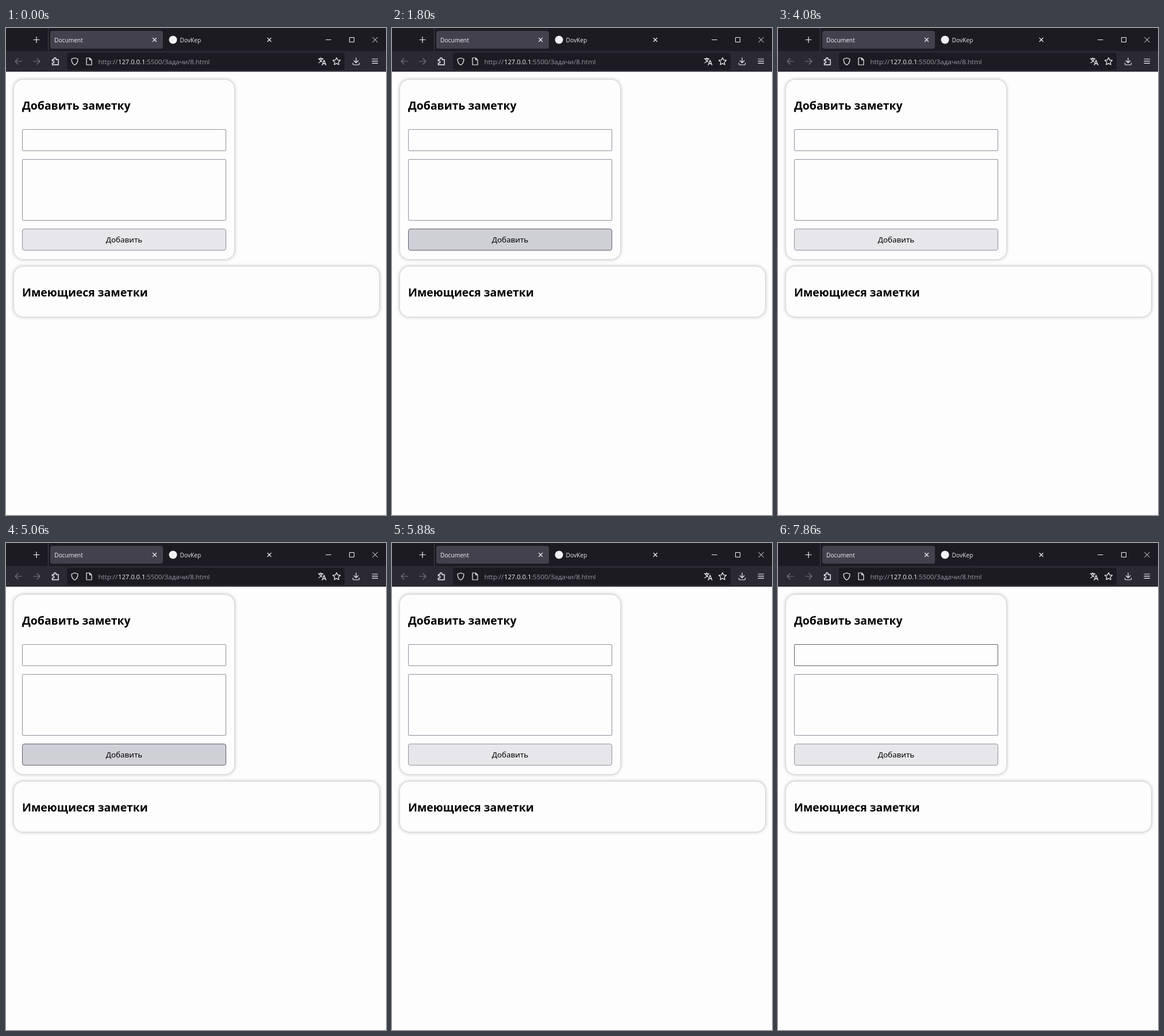
Recreate the animation shown at these times as an HTML page. Size 661 by 847 pixels, loop 8000 ms.

```html
<!DOCTYPE html>
<html lang="ru">
<head>
<meta charset="utf-8">
<title>Document</title>
<style>
  html, body { margin: 0; width: 100%; height: 100%; overflow: hidden; background: #fdfdfd; }
  #stage { position: relative; width: 661px; height: 847px; overflow: hidden; background: #fdfdfd; }
  #stage > * { position: absolute; box-sizing: border-box; }
  svg { left: 0; top: 0; }
  svg text { font-family: "Open Sans", "Noto Sans", sans-serif; }
  .card { left: 14px; background: #fdfdfd; border-radius: 16px; box-shadow: 0 0 6px #a9a9b4; }
  h2 { left: 28px; margin: 0; font: 700 19.4px/28px "Noto Sans", "Open Sans", sans-serif; color: #000; white-space: nowrap; }
  .field { left: 28px; width: 355px; border: 1px solid #8f8f9d; border-radius: 2px; background: #fdfdfd; }
  .field.hover { border-color: #5f5f6b; }
  #button { border-radius: 4px; background: #e7e7eb; font: 13.4px/37px "Noto Sans", "Open Sans", sans-serif; text-align: center; color: #000; }
  #button.hover { background: #cfcfd6; }
</style>
</head>
<body>
<div id="stage">
  <svg width="661" height="76" viewBox="0 0 661 76" fill="none" stroke="#f4f4f8" stroke-width="1.2" stroke-linecap="round" stroke-linejoin="round">
    <g stroke="none">
      <rect width="661" height="40" fill="#1c1b22"/>
      <rect y="40" width="661" height="36" fill="#2b2a33"/>
      <rect x="73" width="1" height="40" fill="#45444e"/>
      <rect x="77" y="5" width="196" height="31" rx="4" fill="#42414d"/>
      <rect x="106" y="43" width="483" height="30" rx="4" fill="#1c1b22"/>
      <circle cx="290.5" cy="20.5" r="7" fill="#f2f2f4"/>
    </g>

    <g stroke="none" fill="#f4f4f8">
      <text x="84" y="24.5" font-size="10.2">Document</text>
      <text x="302.5" y="24.5" font-size="10.2" fill="#e6e6ea">DovKep</text>
      <g font-size="11.5">
        <text x="160.5" y="62.5" fill="#9b9aa2">http://</text>
        <text x="195" y="62.5" font-size="11.2">127.0.0.1</text>
        <text x="242" y="62.5" fill="#9b9aa2">:5500/Задачи/8.html</text>
      </g>
    </g>

    <!-- tab strip and window controls -->
    <path d="M48 20.5h10M53 15.5v10"/>
    <path d="M255.5 17.5l6 6m0-6l-6 6M455 17.5l6 6m0-6l-6 6"/>
    <path d="M556 20.5h9.5M597.5 16.5h8v8h-8zM637.500 16l9 9m0-9l-9 9" stroke-width="1" stroke-linecap="butt" stroke-linejoin="miter"/>

    <!-- navigation -->
    <path d="M27.5 58h-11.5m5-5l-5 5l5 5M47.5 58h11.5m-5-5l5 5l-5 5" stroke="#77767f"/>
    <path d="M80.5 55h3v-1.5a1.8 1.8 0 0 1 3.6 0v1.5h4v9h-10.6v-3h1.5a1.8 1.8 0 0 0 0-3.6h-1.5z" stroke-width="1.4"/>
    <path d="M119.5 52l5.5 2c0 5-1.5 8.5-5.5 10.5c-4-2-5.5-5.5-5.5-10.5z"/>
    <path d="M140 52h5.5l3.5 3.5v8.5h-9zM145.5 52v3.5h3.5"/>

    <!-- address bar and toolbar actions -->
    <path d="M543.5 53.5h8M547.5 51.8v1.7M550 53.5c-.5 3-3 5.5-6 7M545 53.5c.8 2.5 2.5 4.5 4.5 5.5M550 64.5l3.3-8.5l3.3 8.5M551.2 62h4.2" stroke-width="1.3"/>
    <path id="star"/>
    <path d="M609 52v8.5m-3.8-3.7l3.8 3.7l3.8-3.7M603.5 61v1.5a1.5 1.5 0 0 0 1.5 1.5h8a1.5 1.5 0 0 0 1.5-1.5v-1.5"/>
    <path d="M637 54h9.5M637 57.7h9.5M637 61.4h9.5"/>
  </svg>

  <div class="card" style="top:90px;width:383px;height:312px"></div>
  <h2 style="top:121px">Добавить заметку</h2>
  <div id="input" class="field" style="top:176px;height:38px"></div>
  <div id="area" class="field" style="top:228px;height:107px"></div>
  <div id="button" class="field" style="top:349px;height:38px">Добавить</div>

  <div class="card" style="top:415px;width:635px;height:87px"></div>
  <h2 style="top:446px">Имеющиеся заметки</h2>
</div>
<script>
  const LOOP = 8000;
  const fields = ["input", "area", "button"].map(id => document.getElementById(id));

  // Time in ms from which the unseen pointer rests on each field
  const visits = [
    [0, ""],
    [1700, "button"], [1900, "area"], [2040, "input"], [4080, ""],
    [4740, "input"], [4840, "area"], [4980, "button"], [5180, "area"], [5340, "input"], [5480, ""],
    [6440, "area"], [6600, "input"], [6860, "area"], [7240, ""],
    [7560, "input"]
  ];

  const starPoints = Array.from({ length: 10 }, (_, i) => {
    const angle = -Math.PI / 2 + i * Math.PI / 5;
    const r = i % 2 ? 3.3 : 6.8;
    return (575 + r * Math.cos(angle)).toFixed(2) + " " + (58.3 + r * Math.sin(angle)).toFixed(2);
  });
  document.getElementById("star").setAttribute("d", "M" + starPoints.join("L") + "Z");

  function hoveredAt(time) {
    let id = "";
    for (const [start, name] of visits) if (time >= start) id = name;
    return id;
  }

  const begin = performance.now();
  function draw(now) {
    const id = hoveredAt(Math.max(0, now - begin) % LOOP);
    for (const field of fields) field.classList.toggle("hover", field.id === id);
    requestAnimationFrame(draw);
  }
  draw(begin);
</script>
</body>
</html>
```
